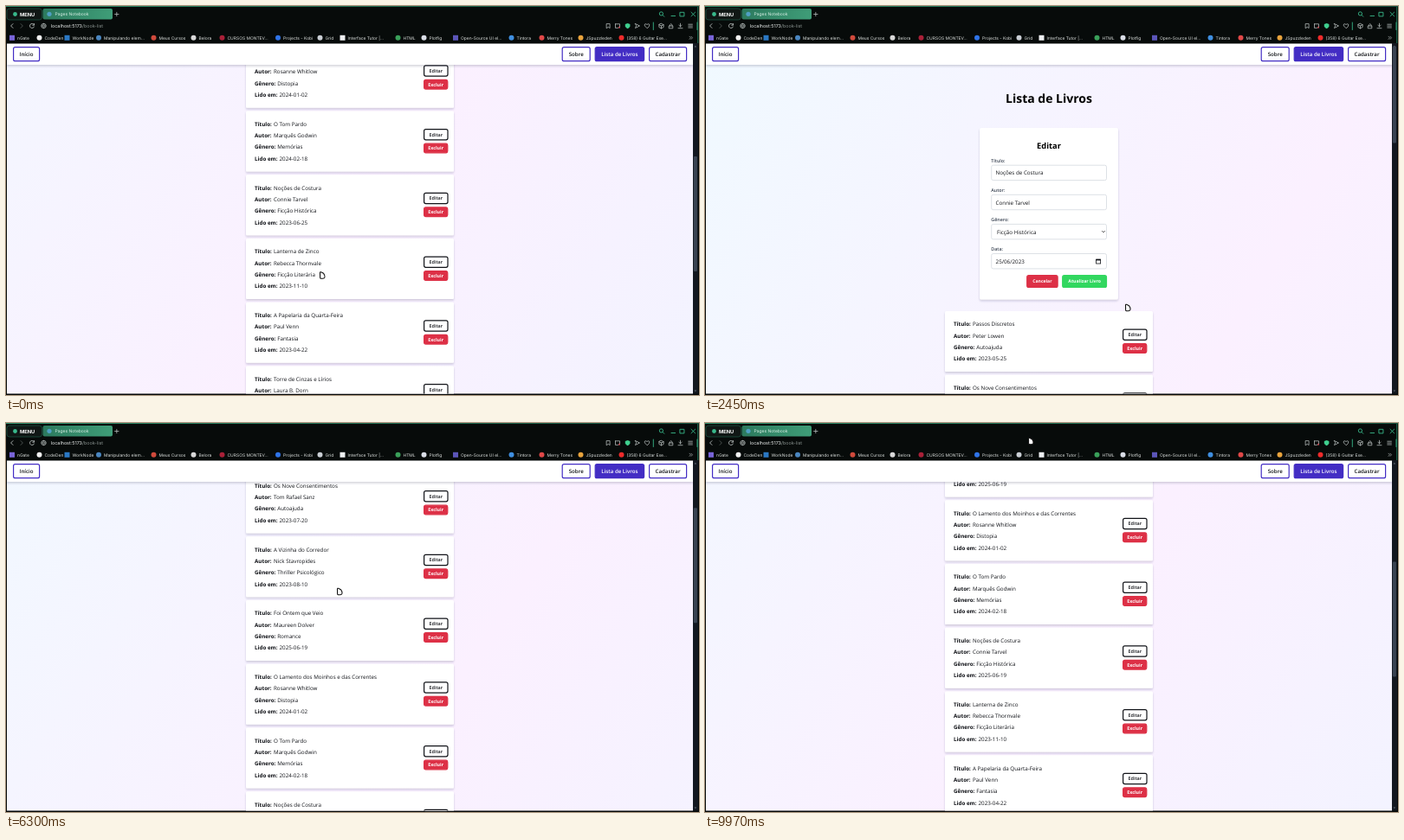
An HTML page that plays this animation: 800x450 px, repeating every 10000 ms.

```html
<!DOCTYPE html>
<html lang="pt">
<head>
<meta charset="utf-8">
<title>Lista de Livros</title>
<style>
html, body { margin: 0; width: 100%; height: 100%; overflow: hidden; background: #000; }
svg { display: block; width: 100vw; height: 100vh; }
text { font-family: "Open Sans", "Noto Sans", sans-serif; text-rendering: geometricPrecision; white-space: pre; }
.ui text { font-family: Inter, Roboto, sans-serif; }
</style>
</head>
<body>
<svg id="stage" viewBox="0 0 800 450" xmlns="http://www.w3.org/2000/svg">
  <defs>
    <linearGradient id="sky" gradientUnits="userSpaceOnUse">
      <stop offset="0" stop-color="#f0f9ff"/>
      <stop offset=".5" stop-color="#fbf0ff"/>
      <stop offset="1" stop-color="#eef5ff"/>
    </linearGradient>
    <linearGradient id="tab" x2="1">
      <stop offset="0" stop-color="#2c7a5e"/>
      <stop offset="1" stop-color="#3f9d78"/>
    </linearGradient>
    <linearGradient id="glow" x2="1">
      <stop offset="0" stop-color="#2f8f6b"/>
      <stop offset="1" stop-color="#14503c"/>
    </linearGradient>
    <filter id="soft" x="-10%" y="-20%" width="120%" height="150%">
      <feDropShadow dx="0" dy="1.7" stdDeviation="1.3" flood-color="#2a2450" flood-opacity=".2"/>
    </filter>
    <filter id="deep" x="-20%" y="-20%" width="140%" height="150%">
      <feDropShadow dx="0" dy="4" stdDeviation="4" flood-color="#000" flood-opacity=".28"/>
    </filter>
    <clipPath id="view"><rect x="1" y="43" width="792" height="405.5"/></clipPath>
  </defs>
  <rect width="800" height="450" fill="#050807"/>
  <g clip-path="url(#view)">
    <g id="page">
      <rect id="back" x="1" y="43" width="792" fill="url(#sky)"/>
      <g id="list"></g>
      <g id="form"></g>
    </g>
    <g id="nav"></g>
    <g id="picker"></g>
  </g>
  <g id="chrome" class="ui"></g>
  <rect x="793" y="43" width="6" height="405.5" fill="#131820"/>
  <path d="M794.6 47.5l1.3-1.8 1.3 1.8zM794.6 444.5l1.3 1.8 1.3-1.8z" fill="#5c6670"/>
  <rect id="thumb" x="793.9" width="4" rx="1" fill="#3a4452"/>
  <g id="cursor" stroke="#111" stroke-width="1.1" stroke-linejoin="round" fill="#fff">
    <path id="arrow" d="M.5 1Q.6 0 1.6.3L4.6 1.8Q6.4 4 6 6.2Q5.4 8 3.4 7.8L1.4 7.6Q.6 7.4.6 6.4Z"/>
    <path id="hand" d="M-.6 .8Q.2-.4 1 .8L1.8 3.4 4.6 4Q6 4.4 5.7 6L5 8.8 1.6 9.4-1.4 6.8Q-1.8 5.4-.2 5.8L.2 5.6Z"/>
  </g>
</svg>
<script>
const $ = id => document.getElementById(id);
const NS = "http://www.w3.org/2000/svg";
const INK = "#111318", RED = "#dd3046", INDIGO = "#432dc4";
const LOOP = 10000, FORM_GAP = 211.5, PITCH = 73.75;

function el(parent, tag, attrs) {
  const e = document.createElementNS(NS, tag);
  for (const k in attrs) e.setAttribute(k, attrs[k]);
  parent.appendChild(e);
  return e;
}
const box = (p, x, y, width, height, fill, more) =>
  el(p, "rect", { x, y, width, height, fill, ...more });
const line = (p, d, stroke, w = 0.8) =>
  el(p, "path", { d, stroke, fill: "none", "stroke-width": w, "stroke-linecap": "round", "stroke-linejoin": "round" });

// y is the middle of the capitals
function label(p, x, y, str, size, fill = INK, weight = 400, anchor = "start") {
  const e = el(p, "text", { x, y: y + size * 0.36, "font-size": size, fill, "font-weight": weight, "text-anchor": anchor });
  e.textContent = str;
  return e;
}
function button(p, x, y, w, h, str, size, fill, border, color, weight = 700) {
  box(p, x, y, w, h, fill, { rx: 2, stroke: border, "stroke-width": 1.2 });
  label(p, x + w / 2, y + h / 2, str, size, color, weight, "middle");
}

const books = [
  ["Passos Discretos", "Peter Lowen", "Autoajuda", "2023-05-25"],
  ["Os Nove Consentimentos", "Tom Rafael Sanz", "Autoajuda", "2023-07-20"],
  ["A Vizinha do Corredor", "Nick Stavropides", "Thriller Psicológico", "2023-08-10"],
  ["Foi Ontem que Veio", "Maureen Dolver", "Romance", "2025-06-19"],
  ["O Lamento dos Moinhos e das Correntes", "Rosanne Whitlow", "Distopia", "2024-01-02"],
  ["O Tom Pardo", "Marquês Godwin", "Memórias", "2024-02-18"],
  ["Noções de Costura", "Connie Tarvel", "Ficção Histórica", "2023-06-25"],
  ["Lanterna de Zinco", "Rebecca Thornvale", "Ficção Literária", "2023-11-10"],
  ["A Papelaria da Quarta-Feira", "Paul Venn", "Fantasia", "2023-04-22"],
  ["Torre de Cinzas e Lírios", "Laura B. Dorn", "Fantasia", "2024-03-15"]
];
const EDITED = 6;
let editedDate;

function buildList() {
  const g = $("list");
  const fields = [["Título:", 309], ["Autor:", 309], ["Gênero:", 313.2], ["Lido em:", 315.5]];
  books.forEach((book, i) => {
    const y = 368 + PITCH * i;
    box(g, 277, y - 15, 240, 70, "#fff", { rx: 1.5, filter: "url(#soft)" });
    fields.forEach(([name, x], k) => {
      label(g, 287, y + k * 13.35, name, 6.25, INK, 700);
      const value = label(g, x, y + k * 13.35, book[k], 6.25);
      if (i === EDITED && k === 3) editedDate = value;
    });
    button(g, 482.6, y + 6.1, 27.4, 12.2, "Editar", 5.4, "#fff", INK, INK, 600);
    button(g, 482.6, y + 22.7, 27.2, 10.6, "Excluir", 5.3, RED, RED, "#fff");
  });
}

let formDate;
function buildForm() {
  label($("page"), 397, 107, "Lista de Livros", 14, "#000", 700, "middle");
  const g = $("form");
  box(g, 317, 141, 160, 198.5, "#fff", { rx: 2, filter: "url(#soft)" });
  label(g, 397, 161.5, "Editar", 9.3, "#000", 700, "middle");
  const [title, author, genre] = books[EDITED];
  [["Título:", title], ["Autor:", author], ["Gênero:", genre], ["Data:", ""]].forEach(([name, value], i) => {
    const y = 178.6 + i * 34.1;
    label(g, 330.3, y, name, 5.35, "#374151", 600);
    box(g, 330.7, y + 5.6, 132.8, 17.4, "#fff", { rx: 2, stroke: "#cfd4dc", "stroke-width": 0.7 });
    const t = label(g, i === 2 ? 337 : 335.6, y + 14.6, value, 6.25);
    if (i === 3) formDate = t;
  });
  line(g, "M458.3 260.3l1.7 1.7 1.7-1.7", "#333", 0.7);
  box(g, 451.6, 293.2, 5, 4.8, "none", { stroke: INK, "stroke-width": 0.8 });
  box(g, 451.4, 292.8, 5.4, 1.6, INK);
  button(g, 371.7, 311.7, 35.4, 13.8, "Cancelar", 5.1, RED, RED, "#fff");
  button(g, 412.7, 311.7, 50.8, 13.8, "Atualizar Livro", 5.15, "#32d75f", "#32d75f", "#fff");
}

const cellX = c => 340.6 + 11.7 * c, cellY = r => 341.6 + 11.7 * r;
let hoverBox;
function buildPicker() {
  const g = $("picker");
  box(g, 330.7, 305, 90, 116.5, "#fff", { rx: 1.5, stroke: "#c4c4c8", "stroke-width": 0.5, filter: "url(#deep)" });
  label(g, 335, 314, "junho de 2023", 5, INK, 700);
  el(g, "path", { d: "M369.8 313h3.2l-1.6 2z", fill: INK });
  line(g, "M397.4 317.3v-6.4m-2.8 2.8l2.8-2.8 2.8 2.8M410.4 311v6.4m-2.8-2.8l2.8 2.8 2.8-2.8", "#333", 0.7);
  [..."DSTQQSS"].forEach((d, c) => label(g, cellX(c), 329.3, d, 5, INK, 400, "middle"));
  hoverBox = box(g, 0, 0, 11, 11, "#add3f3", { stroke: "#3b6f9f", "stroke-width": 0.8 });
  for (let i = 0; i < 42; i++) {
    const n = i - 3, c = i % 7, r = Math.floor(i / 7);
    const day = n < 1 ? n + 31 : n > 30 ? n - 30 : n, picked = n === 25;
    if (picked) box(g, cellX(c) - 5.6, cellY(r) - 5.6, 11.2, 11.2, "#1976d2", { stroke: "#111", "stroke-width": 0.9 });
    label(g, cellX(c), cellY(r), day, 5, picked ? "#fff" : n < 1 || n > 30 ? "#8a8a8a" : INK, picked ? 700 : 400, "middle");
  }
  label(g, 347.4, 412.5, "Limpar", 5, "#0b78d0", 400, "middle");
  label(g, 407, 412.5, "Hoje", 5, "#0b78d0", 400, "middle");
}

function buildNav() {
  const g = $("nav");
  box(g, 1, 43, 792, 25, "#fff", { filter: "url(#soft)" });
  [["Início", 8.6, 30], ["Sobre", 642.2, 32], ["Lista de Livros", 680.2, 56.4], ["Cadastrar", 742.6, 43]].forEach(([s, x, w], i) =>
    button(g, x, 47.7, w, 16, s, 6.15, i === 2 ? INDIGO : "#fff", INDIGO, i === 2 ? "#fff" : INK, 600));
}

function buildChrome() {
  const g = $("chrome"), pale = "#c9d0ce", green = "#38b98b";
  box(g, 0, 0, 800, 43.5, "#070b0a");
  box(g, 0, 0, 800, 1, "url(#glow)");
  box(g, 798.2, 1, 1, 42, "#1d7355");
  box(g, 1, 3, 40.5, 13, "#101715", { rx: 3, stroke: "#1e5a45", "stroke-width": 0.7 });
  el(g, "circle", { cx: 10.5, cy: 9.5, r: 2.4, fill: green });
  label(g, 16, 9.5, "MENU", 5.7, "#fff", 700);
  box(g, 42.5, 3, 80.5, 12.5, "url(#tab)", { rx: 2 });
  el(g, "circle", { cx: 50, cy: 9.3, r: 2.6, fill: "#4f9fc4" });
  label(g, 56.5, 9.3, "Pages Notebook", 5, "#d8efe5");
  line(g, "M125.6 9.5h4.4m-2.2-2.2v4.4", pale, 0.7);
  line(g, "M758 10.5l1.8 1.8M768 11.5h4.6M778.3 7.3h4.6v4.6h-4.6zM791 7.2l4.6 4.6m0-4.6l-4.6 4.6", green, 0.9);
  el(g, "circle", { cx: 756.4, cy: 8.9, r: 2.1, fill: "none", stroke: green, "stroke-width": 0.9 });

  line(g, "M8 20.6L5.6 23 8 25.4M32.2 21.4a2.6 2.6 0 1 0 .3 2.6m0-3.5v1.7h-1.8", pale);
  line(g, "M17 20.6l2.4 2.4-2.4 2.4", "#59615e");
  el(g, "circle", { cx: 43.5, cy: 23, r: 2.7, fill: "none", stroke: pale, "stroke-width": 0.7 });
  line(g, "M41 23h5M43.5 20.4q-2.2 2.6 0 5.2q2.2-2.6 0-5.2", pale, 0.5);
  const url = label(g, 51.7, 23, "localhost:5173", 5.4, "#f2f5f4");
  el(url, "tspan", { fill: "#8b9491" }).textContent = "/book-list";
  line(g, "M693.5 20.6h3.6v5l-1.8-1.3-1.8 1.3zM703.5 20.8h5v3M703.5 20.8v4.6h3M726.5 20.5l5 2.5-5 2.5 1-2.5zM740 25.6l-2.7-2.7q-.7-2.4 1.4-2.2 1 .1 1.3 1 .3-.9 1.3-1 2.1-.2 1.4 2.2zM756.5 20.3l2.6 1.4v2.8l-2.6 1.4-2.6-1.4v-2.8zM753.9 21.7l2.6 1.3 2.6-1.3M756.5 23v2.9M765.6 23h4.2v2.8h-4.2zM766.4 23v-1.2q1.3-2.4 2.6 0v1.2M778.5 20.2v3.6m-1.6-1.5l1.6 1.5 1.6-1.5M776 25.7h5M787.8 21.2h4.6m-4.6 1.9h4.6m-4.6 1.9h4.6", pale, 0.7);
  el(g, "circle", { cx: 708, cy: 24.8, r: 1, fill: "#d85560" });
  el(g, "path", { d: "M717.6 20l2.8 1v2.2q-.4 2-2.8 3-2.4-1-2.8-3v-2.2z", fill: "#3fd08f" });
  line(g, "M747.3 19v8.5M798 19v8.5", green, 0.9);

  // a corner radius of 0 gives a square icon
  [["nGate", 7, "#7864d8", 0], ["CodeDen", 38.5, "#f2f2f2", 3], ["WorkNode", 70.5, "#2b78c4", 0],
   ["Manipulando elem...", 107, "#4a86c0", 3], ["Meus Cursos", 170.5, "#d04a3c", 3], ["Belora", 216.5, "#d8d8d8", 3],
   ["CURSOS MONTEV...", 249.5, "#a92038", 3], ["Projects - Kobi", 314, "#2f74e8", 3], ["Grid", 362.5, "#c9ced4", 3],
   ["Interface Tutor |...", 388.5, "#eef0f2", 0], ["HTML", 452.5, "#3aa05a", 3], ["Plotfig", 482.5, "#d9dde6", 3],
   ["Open-Source UI el...", 519, "#5b55b8", 0], ["Tintora", 583.5, "#3f8fe0", 3], ["Merry Tones", 618.5, "#e04848", 3],
   ["JSpuzzleden", 663.5, "#e8a33c", 3], ["(358) 6 Guitar Exe...", 710.5, "#ef2b2b", 3]].forEach(([s, x, fill, rx]) => {
    box(g, x - 3, 33.8, 6, 6, fill, { rx });
    label(g, x + 6, 36.8, s, 4.95, "#dfe3e1");
  });
  line(g, "M789 35.2l1.5 1.6-1.5 1.6m2-3.2l1.5 1.6-1.5 1.6", pale, 0.6);
}

const smooth = u => u * u * (3 - 2 * u);
function along(keys, t, ease) {
  let i = 0;
  while (i < keys.length - 2 && t >= keys[i + 1][0]) i++;
  const a = keys[i], b = keys[i + 1];
  const u = ease(Math.min(1, Math.max(0, (t - a[0]) / (b[0] - a[0]))));
  return a.slice(1).map((v, k) => v + (b[k + 1] - v) * u);
}

const OPEN = 1400, PICK = 3350, TODAY = 4560, SAVE = 5250;
const cursorKeys = [
  [0, 362, 307.5], [900, 493, 228], [1910, 493, 231], [2100, 493, 231], [2450, 485, 345], [2550, 485, 345],
  [3200, 454, 296], [3400, 454, 296], [3970, 367, 358], [4450, 406, 411], [4650, 406, 411], [5150, 437, 317],
  [5350, 437, 317], [6300, 382, 191], [7240, 348.5, 211], [8200, 338, 290], [9330, 357, 299], [9970, 373, 17]
];
const wheelKeys = [[5685, 0], [6285, 157.75], [7095, 347.25]];

// the page scrolls in steps of one 30 ms screen refresh
function scrollAt(t) {
  const step = Math.floor((t - 15) / 30) * 30 + 15;
  if (t < OPEN) return 388.75;
  if (t < SAVE) return along([[1537, 388.75 + FORM_GAP], [2297, 0]], step, smooth)[0];
  return along(wheelKeys, step, u => u)[0];
}
const show = (e, on) => e.setAttribute("display", on ? "inline" : "none");

// corner to corner: the middle colour lies on the other diagonal
function aimSky(w, h) {
  const k = w * h / (w * w + h * h), dx = h * k, dy = w * k, cx = 1 + w / 2, cy = 43 + h / 2;
  const ends = { x1: cx - dx, y1: cy - dy, x2: cx + dx, y2: cy + dy };
  for (const name in ends) $("sky").setAttribute(name, ends[name]);
}

function draw(t) {
  const form = t >= OPEN && t < SAVE, picker = t >= PICK && t < TODAY;
  const s = scrollAt(t), h = form ? 1427 : 1215;
  $("page").setAttribute("transform", `translate(0 ${-s})`);
  $("list").setAttribute("transform", `translate(0 ${form ? 0 : -FORM_GAP})`);
  $("back").setAttribute("height", h);
  aimSky(792, h);
  show($("form"), form);
  show($("picker"), picker);
  formDate.textContent = t < TODAY ? "25/06/2023" : "19/06/2025";
  editedDate.textContent = t < SAVE ? "2023-06-25" : "2025-06-19";
  $("thumb").setAttribute("y", 46.5 + s * (form ? 0.284 : 0.328));
  $("thumb").setAttribute("height", form ? 112 : 133);

  const [x, y] = along(cursorKeys, t, smooth);
  $("cursor").setAttribute("transform", `translate(${x} ${y})`);
  const hand = (t > 800 && t < 2150) || (t > 5050 && t < 5400);
  show($("hand"), hand);
  show($("arrow"), !hand);

  const c = Math.round((x - cellX(0)) / 11.7), r = Math.round((y - cellY(0)) / 11.7);
  show(hoverBox, picker && c >= 0 && c < 7 && r >= 0 && r < 6);
  hoverBox.setAttribute("x", cellX(c) - 5.5);
  hoverBox.setAttribute("y", cellY(r) - 5.5);
}

buildList();
buildForm();
buildPicker();
buildNav();
buildChrome();

const start = performance.now();
function tick(now) {
  draw(Math.max(0, now - start) % LOOP);
  requestAnimationFrame(tick);
}
draw(0);
requestAnimationFrame(tick);
</script>
</body>
</html>
```
